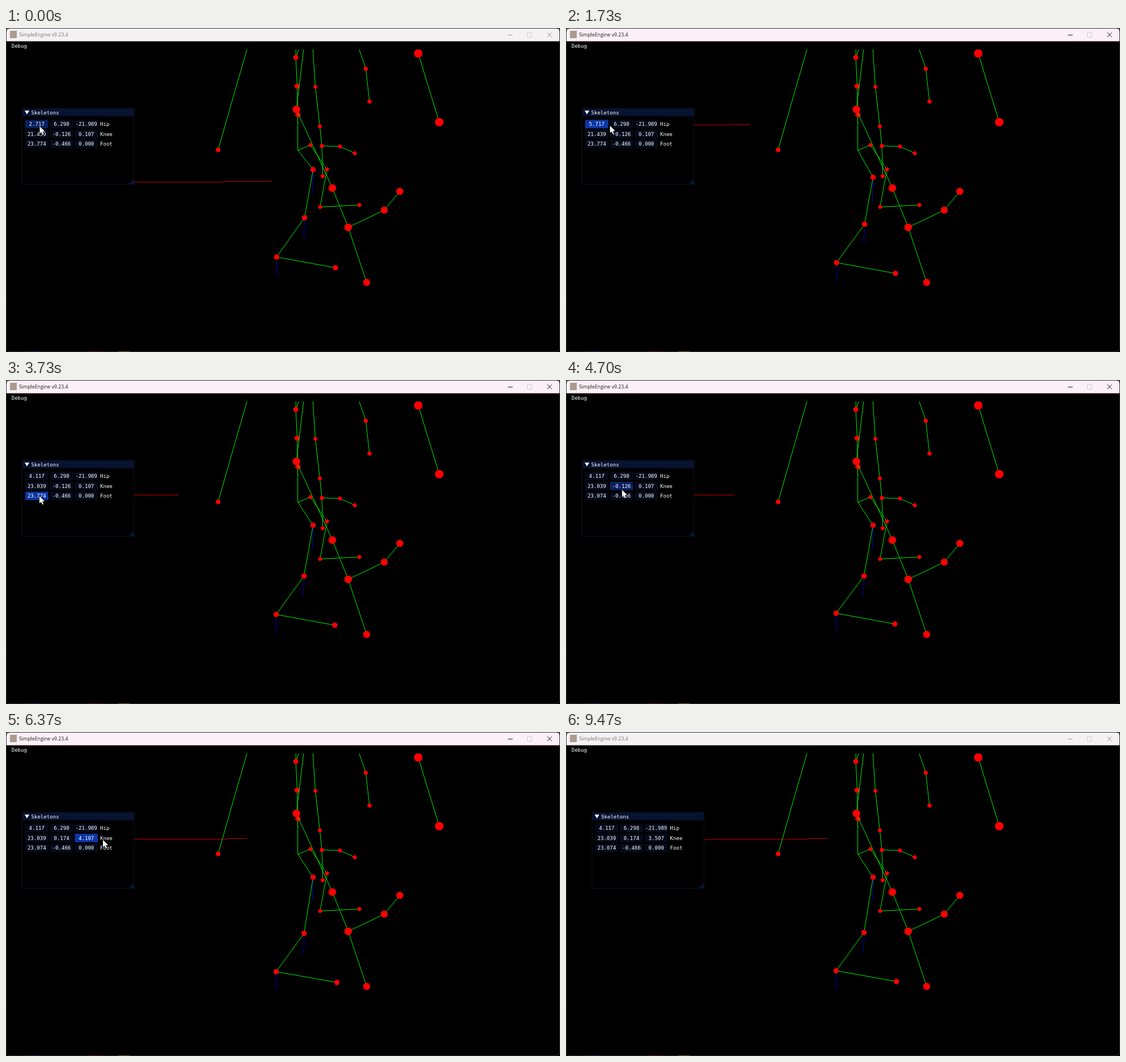
Write an HTML page with a canvas that moves like this. It is 977 px wide and 573 px high and loops after 9560 ms.

```html
<!DOCTYPE html>
<html lang="en">
<head>
<meta charset="utf-8">
<title>Skeleton editor</title>
<style>
html, body { margin: 0; width: 100%; height: 100%; overflow: hidden; background: #000; }
canvas { display: block; }
</style>
</head>
<body>
<canvas id="stage" width="977" height="573"></canvas>
<script>
const g = document.getElementById('stage').getContext('2d');
const LOOP = 9560;
const MONO = '9.07px "DejaVu Sans Mono", monospace';
const SANS = '8.75px "Open Sans", sans-serif';
const PX_PER_UNIT = 7.8;

const rest = [[2.717, 6.298, -21.989], [21.439, -0.126, 0.107], [23.774, -0.466, 0]];
const names = ['Hip', 'Knee', 'Foot'];

// Each drag swings out to a peak, then settles back at its end (in value units)
const drags = [
  { from: 770, turn: 1560, to: 1830, x: 54.5, y: 173, peak: 6.67, end: 1.4, row: 0, col: 0 },
  { from: 2340, turn: 2900, to: 3350, x: 68.6, y: 190, peak: 4, end: 1.6, row: 1, col: 0 },
  { from: 3740, turn: 3885, to: 4230, x: 59, y: 205.5, peak: 2.8, end: -0.7, row: 2, col: 0 },
  { from: 4800, turn: 5420, to: 5800, x: 102, y: 193.5, peak: 8, end: 0.3, row: 1, col: 1 },
  { from: 6100, turn: 6385, to: 6520, x: 140, y: 191, peak: 4, end: 3.4, row: 1, col: 2 },
  { from: 6700, turn: 6900, to: 6901, x: 186, y: 191, peak: 2.25, end: 2.25, panel: true }
];

const clamp = u => Math.max(0, Math.min(1, u));
const mix = (a, b, u) => a + (b - a) * u;
const ease = (t, from, to) => (1 - Math.cos(Math.PI * clamp((t - from) / (to - from)))) / 2;

function dragged(d, t) {
  return t < d.turn ? d.peak * ease(t, d.from, d.turn) : mix(d.peak, d.end, ease(t, d.turn, d.to));
}

const grip = (d, t) => ({ x: d.x + dragged(d, t) * PX_PER_UNIT, y: d.y });

function glide(t, from, to, x0, y0, x1, y1) {
  const u = clamp((t - from) / (to - from));
  return { x: mix(x0, x1, u), y: mix(y0, y1, u) };
}

function cursorAt(t) {
  if (t < 770) {
    const u = clamp(t / 630);
    return { x: mix(59.5, 54.5, u), y: 174 - u + 24 * Math.sin(Math.PI * u) };
  }
  if (t >= 8800) return t < 9030 ? glide(t, 8800, 9030, 18, 508, 24, 574) : null;
  if (t >= 8030) return t < 8200 ? glide(t, 8030, 8200, 84, 181, 30, 298) : null;
  if (t >= 7720) return null;
  if (t >= 7070) {
    const y = mix(191, 272, (t - 7070) / 630);
    const out = mix(203.5, 467, ease(t, 7070, 7522));
    return { x: mix(out, 5, ease(t, 7522, 7700)), y };
  }
  const i = drags.findLastIndex(d => t >= d.from);
  const last = drags[i], next = drags[i + 1];
  const a = grip(last, t);
  if (!next || t < last.to) return a;
  const u = ease(t, mix(last.to, next.from, 0.3), next.from - 40);
  return { x: mix(a.x, next.x, u), y: mix(a.y, next.y, u) };
}

function stateAt(t) {
  const values = rest.map(r => r.slice());
  let held = null, shift = 0, ray = { x: 211, y: 273.7 };
  for (const d of drags) {
    if (t < d.from - 30) break;
    ray = grip(d, t);
    if (d.panel) shift = ray.x - d.x;
    else values[d.row][d.col] += Math.round(dragged(d, t) * 10) / 10;
    if (t < d.to + 30) held = d;
  }
  return { values, held, shift, ray, cursor: cursorAt(t), focused: t >= 770 && t < 9470 };
}

function rect(color, x, y, w, h) {
  g.fillStyle = color;
  g.fillRect(x, y, w, h);
}

function line(color, ...pts) {
  g.strokeStyle = color;
  g.lineWidth = 1;
  g.beginPath();
  for (let i = 0; i < pts.length; i += 2) g.lineTo(pts[i], pts[i + 1]);
  g.stroke();
}

// Line without smoothing, one pixel per step of its longer side
function pixelLine(color, x0, y0, x1, y1) {
  const n = Math.ceil(Math.max(Math.abs(x1 - x0), Math.abs(y1 - y0)));
  for (let i = 0; i < n; i++) {
    rect(color, Math.floor(mix(x0, x1, i / n)), Math.floor(mix(y0, y1, i / n)), 1, 1);
  }
}

function poly(color, ...pts) {
  g.fillStyle = color;
  g.beginPath();
  for (let i = 0; i < pts.length; i += 2) g.lineTo(pts[i], pts[i + 1]);
  g.closePath();
  g.fill();
}

function text(str, x, y, color, font, align = 'left') {
  g.font = font;
  g.fillStyle = color;
  g.textAlign = align;
  g.fillText(str, x, y);
}

function dot(x, y, r) {
  g.fillStyle = '#f00';
  g.beginPath();
  g.arc(x, y, r, 0, 7);
  g.fill();
}

function limb(r, ...pts) {
  line('#00f000', ...pts);
  for (let i = 0; i < pts.length; i += 2) dot(pts[i], pts[i + 1], r);
}

function drawBody() {
  line('#00f000', 523, 20, 511, 52);
  line('#00f000', 514.6, 153, 514.6, 216, 537, 207);
  limb(4, 430, 20, 374, 215.5);
  limb(4.6, 511.5, 20, 511, 52, 513.5, 103, 514.8, 153.5);
  limb(6.7, 527, 20, 512, 144, 575.5, 283, 603.5, 352.5);
  limb(6.2, 636, 450, 603.5, 352.5, 667, 322, 694.5, 289);
  limb(7.5, 716, 20, 727, 45, 764, 166.5);
  limb(3.5, 537, 207, 566, 250, 554, 316.5, 623, 313);
  limb(3.5, 540, 20, 545.5, 104, 553.5, 174, 557, 208.5, 558.5, 262);
  limb(3.5, 557, 208.5, 589, 209.5, 615, 221.5);
  limb(3.7, 617, 20, 634.5, 72, 641, 130);
}

// The knee's offset carries foot and toe along, a little smaller with distance
function drawLeg(values) {
  const hip = values[0][0] - rest[0][0];
  const [kx, ky, kz] = values[1].map((n, i) => n - rest[1][i]);
  const foot = values[2][0] - rest[2][0];
  const dx = -0.6 * kx - 4.22 * ky + 0.35 * kz;
  const dy = 3.82 * hip + 3.6 * kx - 0.43 * ky + 2.4 * kz;
  const drop = 0.87 * dy + 0.8 * kz + 3.1 * foot;
  const H = [541.5, 250.5 + 4.5 * hip];
  const K = [526.5 + dx, 335.5 + dy];
  const F = [477.2 + 0.87 * dx, 405 + drop];
  const T = [581 + 0.87 * dx - 0.2 * kx + 0.9 * kz, 424 + drop];

  const axis = ([x, y], lean, len) => pixelLine('#0000b4', x, y, x + lean, y + len);
  axis(H, -1.2, 43);
  axis(K, -1, 36);
  axis(F, 0.4, 33);
  line('#00f000', 514.6, 216, ...H);
  limb(4.7, ...H, ...K, ...F, ...T);
}

function drawPanel({ cursor, held, values, shift }) {
  g.save();
  g.translate(shift, 0);
  rect('rgba(0,0,0,0.94)', 28, 142, 198, 135);
  rect('#061230', 28, 142, 198, 14);
  g.strokeStyle = '#10131f';
  g.lineWidth = 1;
  g.strokeRect(28.5, 142.5, 197.5, 134);
  poly('#fff', 33, 146, 41, 146, 37, 152.8);
  text('Skeletons', 44.5, 152.6, '#fff', MONO);
  poly('#06143a', 226, 266.5, 226, 276.5, 216, 276.5);

  const w = 40.5, h = 14.8;
  values.forEach((row, r) => {
    const y = 162.5 + r * 17.5;
    row.forEach((n, c) => {
      const x = 34 + c * 43.7;
      const u = cursor ? cursor.x - shift - x : -1, v = cursor ? cursor.y - y : -1;
      const over = !held && u >= 0 && u < w && v >= 0 && v < h;
      const active = held && held.row === r && held.col === c;
      rect(active ? '#0b36a6' : over ? '#08205e' : '#050b1a', x, y, w, h);
      text(n.toFixed(3), x + w / 2, y + 10.7, '#fff', MONO, 'center');
    });
    text(names[r], 166, y + 10.7, '#fff', MONO);
  });
  g.restore();
}

function drawFrame(focused) {
  const ink = focused ? '#151515' : '#8f8f8f';
  rect('#000', 0, 23, 977, 15);
  text('Debug', 9.7, 34.6, '#fff', MONO);
  rect(focused ? '#fdf0f6' : '#f5f1f3', 1, 1, 975, 22.5);
  rect('#a99c8e', 7, 5, 12, 13);
  text('SimpleEngine v9.23.4', 23, 15.2, focused ? '#1a1a1a' : '#777', SANS);
  line(ink, 885, 12.5, 893.5, 12.5);
  line(ink, 954.5, 8, 962.5, 16);
  line(ink, 962.5, 8, 954.5, 16);
  g.strokeStyle = '#d2cbd0';
  g.strokeRect(919.5, 8.5, 7.5, 7.5);
  g.strokeStyle = '#303030';
  g.beginPath();
  g.roundRect(0.5, 0.5, 976, 572, 6);
  g.stroke();
  rect('#1d3f6e', 40, 572, 16, 1);
  rect('#7a2328', 145, 572, 20, 1);
  rect('#8a7136', 199, 572, 19, 1);
  rect('#17606a', 0, 475, 1, 4);
}

function drawCursor({ x, y }) {
  g.save();
  g.translate(x, y);
  g.lineJoin = 'round';
  g.lineWidth = 1.4;
  g.strokeStyle = '#000';
  poly('#fff', 0, 0, 0, 12.6, 2.9, 10, 5, 14.8, 7, 13.9, 5, 9.3, 9, 9);
  g.stroke();
  poly('#fff', 0, 0, 0, 12.6, 2.9, 10, 5, 14.8, 7, 13.9, 5, 9.3, 9, 9);
  g.restore();
}

function draw(t) {
  const s = stateAt(t);
  const { x, y } = s.ray;
  rect('#000', 0, 0, 977, 573);
  pixelLine('#c40000', x + 14, y - 0.8, 304 + 1.087 * (x - 59), y - 2.2);
  drawBody();
  drawLeg(s.values);
  drawPanel(s);
  drawFrame(s.focused);
  if (s.cursor) drawCursor(s.cursor);
}

const start = performance.now();
function tick() {
  draw((performance.now() - start) % LOOP);
  requestAnimationFrame(tick);
}
tick();
</script>
</body>
</html>
```
